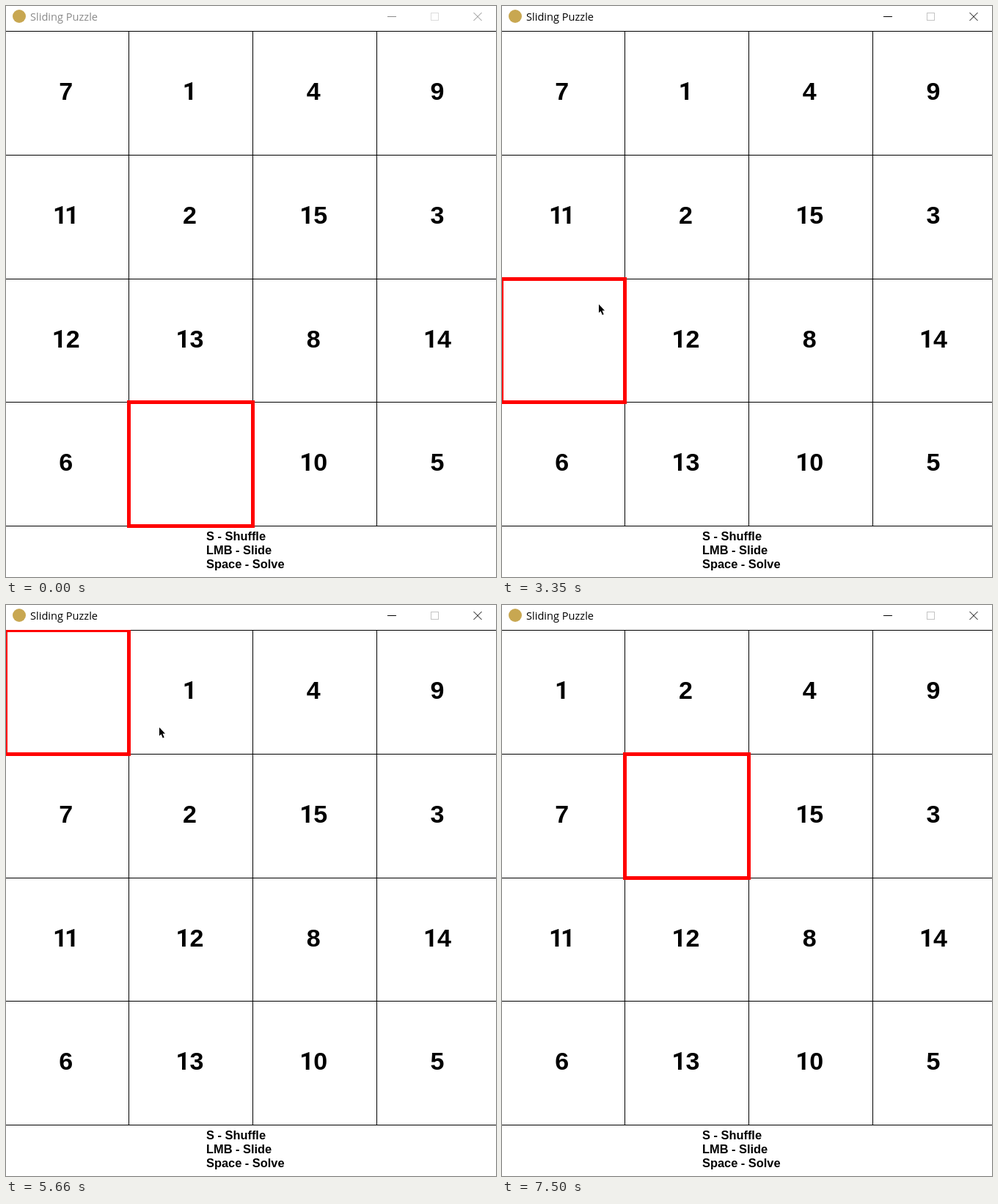
Animation, 668 px wide and 779 px high, one loop 8 s. Source, as an HTML page:

```html
<!DOCTYPE html>
<html lang="en">
<head>
<meta charset="utf-8">
<title>Sliding Puzzle</title>
<style>
  html, body { margin: 0; width: 100%; height: 100%; overflow: hidden; background: #fff; }
  svg { display: block; width: 668px; height: 779px; }
  .title { font: 14.6px "Open Sans", "Noto Sans", sans-serif; fill: #000; }
  .controls { fill: none; stroke: #000; }
  .controls .max { stroke: #c4c4c4; }
  .idle .title { fill: #8a8a8a; }
  .idle .controls { stroke: #8a8a8a; }
  .idle .controls .max { stroke: #dcdcdc; }
  .tile { font: bold 34px "Liberation Sans", Arial, sans-serif; text-anchor: middle; }
  .one { font-family: Roboto, sans-serif; }
  .help { font: bold 16.4px "Liberation Sans", Arial, sans-serif; }
</style>
</head>
<body>
<svg viewBox="0 0 668 779">
  <defs><clipPath id="area"><rect y="34" width="668" height="745"/></clipPath></defs>
  <g id="bar">
    <circle cx="18" cy="14" r="9" fill="#c8a751"/>
    <text class="title" x="33" y="20">Sliding Puzzle</text>
    <g class="controls">
      <path d="M520 14.5H532M637.5 9L648.5 20M648.5 9L637.5 20"/>
      <rect class="max" x="579.5" y="9.5" width="10" height="10"/>
    </g>
  </g>
  <path id="grid" fill="none" stroke="#000"/>
  <g id="tiles"></g>
  <path id="gap" clip-path="url(#area)" fill="none" stroke="#f00" stroke-width="5"/>
  <g class="help">
    <text x="273" y="729">S - Shuffle</text>
    <text x="273" y="748">LMB - Slide</text>
    <text x="273" y="767">Space - Solve</text>
  </g>
  <circle id="press" r="15" fill="#ff0" fill-opacity=".47"/>
  <path id="cursor" d="M0 0V11.6L2.6 9.3L4.8 14.4L6.7 13.6L4.5 8.6H8Z" fill="#000"
        stroke="#fff" paint-order="stroke"/>
</svg>
<script>
const LOOP = 8000;
const STEP = 78;   // ms between pointer updates
const HOLD = 80;   // ms a click stays marked
const CELL = 168.75;
const start = [7, 1, 4, 9, 11, 2, 15, 3, 12, 13, 8, 14, 6, 0, 10, 5];

// Where the pointer glides and when it clicks there.
const stops = [
  { leave: 1080, arrive: 1630, press: 1860, x: 212, y: 500 },
  { leave: 2180, arrive: 2650, press: 2880, x: 132, y: 491 },
  { leave: 3040, arrive: 3820, press: 3890, x: 132, y: 340 },
  { leave: 4350, arrive: 4890, press: 5040, x: 129, y: 178 },
  { leave: 5350, arrive: 5815, press: 5892, x: 228, y: 165 },
  { leave: 6120, arrive: 6430, press: 6660, x: 228, y: 238 },
  { leave: 7270, arrive: 7500, press: Infinity, x: -40, y: 267 }
];

const $ = id => document.getElementById(id);
const place = (el, x, y) => el.setAttribute("transform", `translate(${x} ${y})`);
const col = i => i % 4;
const row = i => Math.floor(i / 4);
const edgeX = c => Math.floor(c * CELL - 1) + 0.5;
const edgeY = r => Math.floor(r * CELL + 34.5) + 0.5;
const cellUnder = ({ x, y }) => Math.floor(x / CELL) + 4 * Math.floor((y - 35) / CELL);

function makeSvg(name, parent) {
  const el = document.createElementNS("http://www.w3.org/2000/svg", name);
  parent.append(el);
  return el;
}

function makeTile(n) {
  const text = makeSvg("text", $("tiles"));
  const digits = [...String(n)];
  const spread = digits.length === 1 ? 0 : n === 11 ? 8 : 9.4;
  text.setAttribute("class", "tile");
  digits.forEach((d, i) => {
    const span = makeSvg("tspan", text);
    span.textContent = d;
    if (d === "1") span.setAttribute("class", "one");
    span.setAttribute("x", i ? spread : -spread);
  });
  return text;
}

function drawGrid() {
  let d = "";
  for (let i = 0; i <= 4; i++) {
    d += `M0 ${edgeY(i)}H668`;
    if (i % 4) d += `M${edgeX(i)} ${edgeY(0)}V${edgeY(4)}`;
  }
  $("grid").setAttribute("d", d);
}

function boardAt(t) {
  const board = start.map((_, i) => i);
  let gap = start.indexOf(0);
  for (const stop of stops.filter(s => t >= s.press)) {
    const cell = cellUnder(stop);
    [board[gap], board[cell]] = [board[cell], board[gap]];
    gap = cell;
  }
  return { board, gap };
}

function cursorAt(t) {
  let from = { x: -20, y: 520 };
  for (const to of stops) {
    if (t < to.leave) break;
    const count = Math.round((to.arrive - to.leave) / STEP) + 1;
    const step = Math.min(count, Math.floor((t - to.leave + 8) / STEP) + 1);
    const p = 1 - Math.pow(1 - step / count, 1.33);
    from = { x: from.x + (to.x - from.x) * p, y: from.y + (to.y - from.y) * p };
  }
  return from;
}

const tiles = start.map(n => n ? makeTile(n) : null);
drawGrid();

function draw(t) {
  const { board, gap } = boardAt(t);
  board.forEach((id, i) => {
    if (tiles[id]) place(tiles[id], 81.8 + col(i) * CELL, 128 + row(i) * CELL);
  });
  const c = col(gap), r = row(gap);
  $("gap").setAttribute("d", `M${edgeX(c)} ${edgeY(r)}H${edgeX(c + 1)}V${edgeY(r + 1)}H${edgeX(c)}Z`);
  $("bar").setAttribute("class", t < stops[0].press ? "idle" : "");

  const { x, y } = cursorAt(t);
  place($("cursor"), Math.round(x), Math.round(y));
  const pressed = stops.some(s => t >= s.press && t < s.press + HOLD);
  $("press").style.display = pressed ? "" : "none";
  place($("press"), Math.round(x) - 1, Math.round(y) - 1);
}

const begin = performance.now();
function frame() {
  draw((performance.now() - begin) % LOOP);
  requestAnimationFrame(frame);
}
frame();
</script>
</body>
</html>
```
